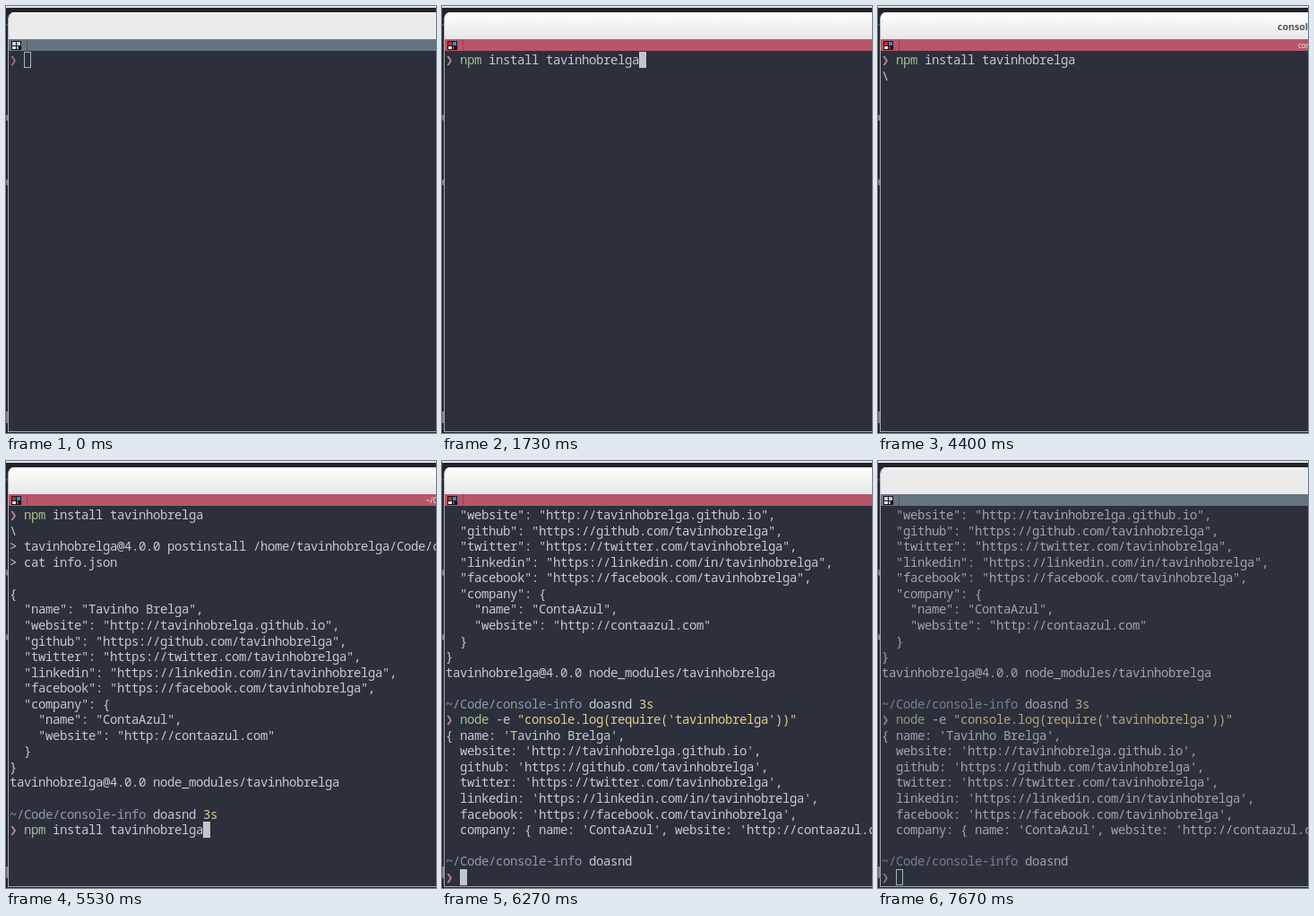
Recreate the animation shown at these times as an HTML page. Size 480 by 476 pixels, loop 7740 ms.

```html
<!DOCTYPE html>
<html lang="en">
<head>
<meta charset="utf-8">
<title>Terminal session</title>
<style>
html, body { margin: 0; width: 100%; height: 100%; overflow: hidden; background: #22232b; }
#stage { position: absolute; left: 0; top: 0; width: 480px; height: 476px; overflow: hidden; background: #22232b; }
#stage div { position: absolute; }
.strip { left: 0; top: 0; width: 480px; height: 2px; background: #e4e4e7; }
.scrap { left: 0; width: 2px; background: #777b82; }
.window { left: 2px; top: 7px; width: 500px; height: 468px; box-sizing: border-box;
  border: solid #a9adb3; border-width: 0 0 1px 1px; border-radius: 7px 0 0 0; background: #2b303b; overflow: hidden; }
.header { left: 0; top: 0; width: 100%; height: 30px; background: #ebebec; border-top: 1px solid #f6f6f6; box-sizing: border-box; }
#glow { inset: 0; background: linear-gradient(#fefefe, #e8e6e7); }
#title { left: 443px; top: 7px; white-space: nowrap; font: bold 10.6px/16px "Noto Sans", "Open Sans", sans-serif; color: #4b5364; }
.bar { left: 0; top: 30px; width: 100%; height: 13px; background: #667482; }
#red { inset: 0; background: #b95569; }
#label { left: 466px; top: 0; white-space: nowrap; font: 8px/13px "Noto Sans", sans-serif; color: #f3eef0; }
.divider { left: 20px; top: 0; width: 1px; height: 13px; background: #0003; }
svg { position: absolute; left: 3px; top: 2px; }
#screen { left: 4px; top: 51.2px; font: 14px/17.55px "Noto Sans Mono", "DejaVu Sans Mono", monospace; letter-spacing: -0.4px; color: #c4c9d2; white-space: pre; }
#screen .line { position: static; height: 17.55px; }
.prompt { color: #b8879a; }
.cmd { color: #a9be90; }
.str { color: #e6ca90; }
.path { color: #8f9aab; }
#cursor { width: 8px; height: 18px; box-sizing: border-box; background: #c0c5ce; }
#cursor.hollow { background: none; border: 1px solid #a8b4ba; }
</style>
</head>
<body>
<div id="stage">
  <div class="strip"></div>
  <div class="scrap" style="top:20px;height:2px;opacity:.4"></div>
  <div class="scrap" style="top:121px;height:7px;border-radius:3px 0 0 3px"></div>
  <div class="scrap" style="top:193px;height:7px;border-radius:3px 0 0 3px"></div>
  <div class="scrap" style="top:452px;height:13px"></div>
  <div class="window">
    <div class="header"><div id="glow"></div><div id="title"></div></div>
    <div class="bar">
      <div id="red"></div>
      <svg width="14" height="11">
        <path d="M0 0h11v10H0z" fill="#15161a"/>
        <path id="cellA" d="M1 1h4v4H1z"/>
        <path id="cellB" d="M6 1h4v4H6z"/>
        <path d="M1 6h4v3H1z" fill="#e6e6e8"/>
        <path id="cellC" d="M6 6h2v3H6z"/>
        <path d="M7 7h5l-2.5 3z" fill="#15161a"/>
      </svg>
      <div class="divider"></div>
      <div id="label"></div>
    </div>
  </div>
  <div id="screen"></div>
  <div id="cursor"></div>
</div>
<script>
const LOOP = 7740, ROW = 17.55, COL = 8, ROWS = 24;
const FOCUS = 270, BLUR = 7400, FADE = 200;
const INSTALL = 1930, OUTPUT = 4530, PROMPT2 = 4730, RUN = 5870, RESULT = 6000, PROMPT3 = 6070;
const handle = "tavinhobrelga", person = "Tavinho Brelga";
const $ = id => document.getElementById(id);
const clamp = (v, lo, hi) => Math.min(hi, Math.max(lo, v));
const span = (kind, text) => `<span class="${kind}">${text}</span>`;

const arrow = span("prompt", "❯") + " ";
const install = { html: span("cmd", "npm") + " install " + handle, length: 25 };
const run = { html: span("cmd", "node") + " -e " + span("str", `"console.log(require('${handle}'))"`), length: 47 };
const blank = { html: "", length: 0 };
const where = span("path", "~/Code/console-info") + " doasnd";

const links = [
  ["website", `http://${handle}.github.io`],
  ["github", `https://github.com/${handle}`],
  ["twitter", `https://twitter.com/${handle}`],
  ["linkedin", `https://linkedin.com/in/${handle}`],
  ["facebook", `https://facebook.com/${handle}`]
];
const installOutput = [
  `&gt; ${handle}@4.0.0 postinstall /home/${handle}/Code/console-info/node_modules/${handle}`,
  "&gt; cat info.json", "", "{",
  `  "name": "${person}",`,
  ...links.map(([key, url]) => `  "${key}": "${url}",`),
  '  "company": {', '    "name": "ContaAzul",', '    "website": "http://contaazul.com"', "  }", "}",
  `${handle}@4.0.0 node_modules/${handle}`
];
const runOutput = [
  `{ name: '${person}',`,
  ...links.map(([key, url]) => `  ${key}: '${url}',`),
  "  company: { name: 'ContaAzul', website: 'http://contaazul.com' } }"
];

// [start, ticks] of each burst of the progress spinner
const bursts = [[2270, 3], [2730, 7], [3270, 2], [3470, 8], [4060, 6]];
function spinner(t) {
  const ticks = bursts.reduce((sum, [start, n]) => sum + clamp(Math.floor((t - start) / 66.6) + 1, 0, n), 0);
  return ticks ? "/-\\|"[ticks % 4] : "";
}

function session(t) {
  const first = t < 1070 ? blank : t < 1400 ? run : install;
  const lines = [arrow + first.html];
  let col = 2 + first.length;
  if (t >= INSTALL) { lines.push(spinner(t)); col = 0; }
  if (t >= OUTPUT) lines.push(...installOutput);
  if (t >= PROMPT2) {
    const second = t < 5130 ? blank : t < 5640 ? install : run;
    lines.push("", where + " " + span("str", "3s"), arrow + second.html);
    col = 2 + second.length;
  }
  if (t >= RUN) { col = 0; lines.push(...(t < RESULT ? [""] : runOutput)); }
  if (t >= PROMPT3) { lines.push("", where, arrow); col = 2; }
  return { lines: lines.slice(-ROWS), col };
}

function cursorVisible(t) {
  const blinkedOff = (t >= 870 && t < 1070) || (t >= 6670 && t < 7270);
  const busy = (t >= 2270 && t < PROMPT2) || (t >= RESULT && t < PROMPT3);
  return !blinkedOff && !busy;
}

function titles(t) {
  if (t >= INSTALL && t < OUTPUT) return ["console-info: npm install " + handle, "console-info: npm install " + handle];
  if (t >= PROMPT2 && t < RUN) return ["", "~/Code/console-info"];
  if (t >= RUN && t < PROMPT3) return ["console-info: node", "console-info: node"];
  return ["", ""];
}

let shown = "";
function draw(t) {
  const { lines, col } = session(t);
  const html = lines.map(line => `<div class="line">${line}</div>`).join("");
  if (html !== shown) $("screen").innerHTML = shown = html;

  const focused = t >= FOCUS && t < BLUR;
  $("screen").style.opacity = focused ? 1 : 0.75;
  $("glow").style.opacity = clamp((t - FOCUS) / FADE, 0, 1) * clamp((BLUR + FADE - t) / FADE, 0, 1);
  $("red").style.opacity = focused ? 1 : 0;
  $("cellA").setAttribute("fill", focused ? "#d8232f" : "#c9ced2");
  $("cellB").setAttribute("fill", focused ? "#3a8fc0" : "#c9ced2");
  $("cellC").setAttribute("fill", focused ? "#d8232f" : "#c9ced2");
  [$("title").textContent, $("label").textContent] = titles(t);

  const cursor = $("cursor");
  cursor.className = focused ? "" : "hollow";
  cursor.style.visibility = cursorVisible(t) ? "visible" : "hidden";
  cursor.style.left = 4 + col * COL + "px";
  cursor.style.top = Math.round(51 + (lines.length - 1) * ROW) + "px";
}

const begin = performance.now();
function tick() {
  draw((performance.now() - begin) % LOOP);
  requestAnimationFrame(tick);
}
tick();
</script>
</body>
</html>
```
